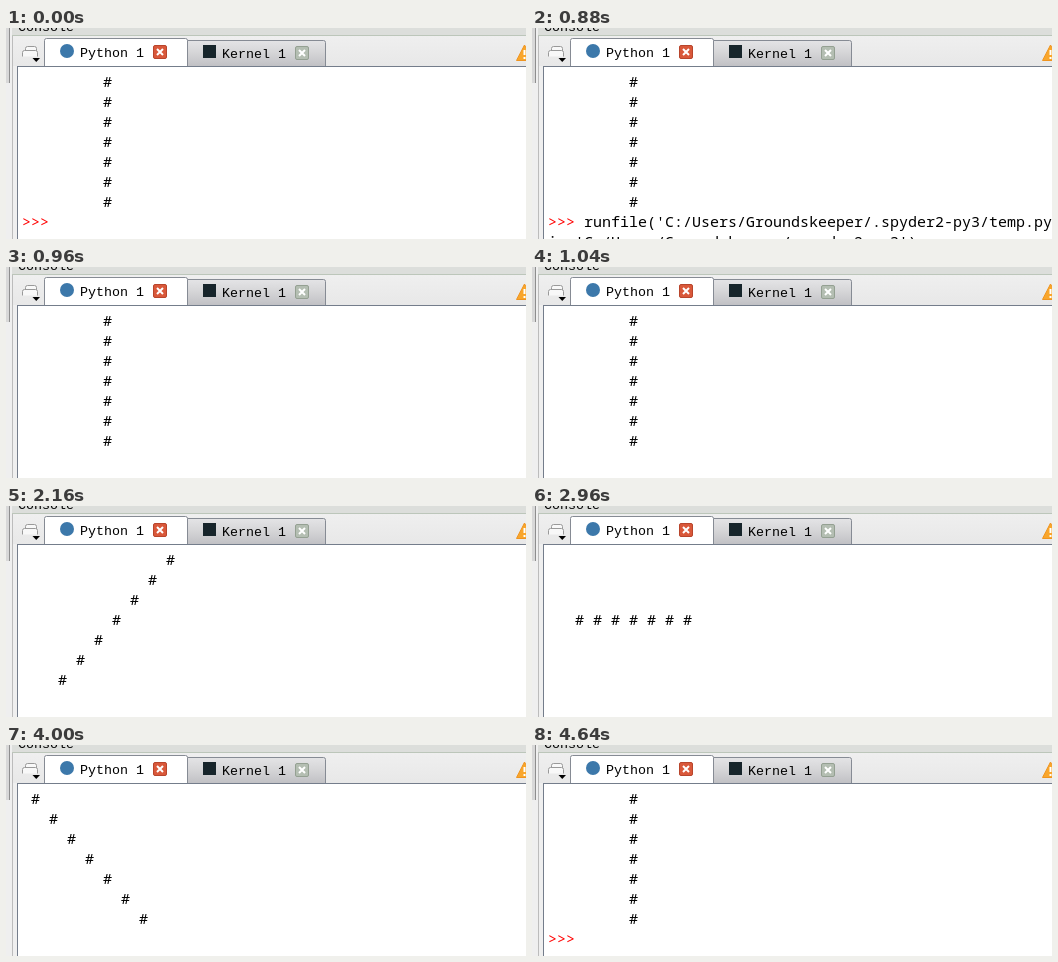
Write an HTML page that moves like this. It is 520x211 px and loops after 5.76 s.

```html
<!DOCTYPE html>
<html lang="en">
<head>
<meta charset="utf-8">
<title>Console</title>
<style>
html, body { margin: 0; width: 100%; height: 100%; overflow: hidden; background: #fff; }
svg { display: block; width: 520px; height: 211px; }
text { white-space: pre; }
.ui { font: 13.333px "Liberation Mono", monospace; fill: #000; }
.code { font: 15px "Noto Sans Mono", "DejaVu Sans Mono", monospace; fill: #000; }
.prompt { fill: #f00; }
.crisp { shape-rendering: crispEdges; }
</style>
</head>
<body>
<svg viewBox="0 0 520 211">
  <defs>
    <linearGradient id="bar" x2="0" y2="1">
      <stop stop-color="#efefef"/><stop offset="1" stop-color="#e8e8e8"/>
    </linearGradient>
    <linearGradient id="idle" x2="0" y2="1">
      <stop stop-color="#e4e4e6"/><stop offset=".45" stop-color="#d6d6d8"/><stop offset="1" stop-color="#c0c0c4"/>
    </linearGradient>
    <g id="cross">
      <rect x=".5" y=".5" width="13" height="13" rx="1.5"/>
      <path d="M4 4l6 6M10 4l-6 6" fill="none" stroke="#fff" stroke-width="2"/>
    </g>
  </defs>

  <rect width="520" height="211" fill="#efefef"/>
  <g class="crisp">
    <rect x="6" width="514" height="7" fill="#dcdedb"/>
    <rect x="6" y="7" width="514" height="1" fill="#bcc6ba"/>
    <rect x="6" y="8" width="514" height="30" fill="url(#bar)"/>
    <rect width="3" height="55" fill="#d8d8d8"/>
    <rect x="3" width="1" height="55" fill="#8e8e8e"/>
    <rect x="6" y="8" width="1" height="203" fill="#bcbcbc"/>
  </g>
  <text class="ui" x="12" y="3">Console</text>

  <path d="M181.500 38.500V12.500H317.500Q319.500 12.500 319.500 14.500V38.500Z" fill="url(#idle)" stroke="#868b94"/>
  <path d="M38.500 39V12.500Q38.500 10.500 40.500 10.500H179.500Q181.500 10.500 181.500 12.500V39" fill="#fff" stroke="#868b94"/>
  <rect class="crisp" x="11.500" y="38.500" width="520" height="180" fill="#fff" stroke="#747d8b"/>

  <g fill="#f8f8f8" stroke="#999">
    <path d="M19.500 24V20.500Q19.500 18.500 21.500 18.500H28.500Q30.500 18.500 30.500 20.500V24"/>
    <path d="M16.500 28.500V24.500Q16.500 22.500 18.500 22.500H29.500Q31.500 22.500 31.500 24.500V28.500"/>
  </g>
  <path d="M26.500 30h7.500l-3.750 4z"/>

  <circle cx="61" cy="23" r="7" fill="#3c78aa"/>
  <text class="ui" x="74" y="29">Python 1</text>
  <use href="#cross" x="147" y="17" fill="#d9583a" stroke="#b8452c"/>

  <rect class="crisp" x="197" y="17" width="13" height="13" fill="#17252b"/>
  <text class="ui" x="216" y="30">Kernel 1</text>
  <use href="#cross" x="289" y="18" fill="#b4beb2" stroke="#94a092"/>

  <path d="M518.500 17L527 32.500H510.500Z" fill="#f9a62b" stroke="#ee9420" stroke-linejoin="round"/>
  <path d="M518.500 22v5M518.500 29v2" stroke="#fff" stroke-width="2"/>

  <g id="marks" class="code"></g>
  <text id="prompt" class="code prompt" x="16" y="199">&gt;&gt;&gt;</text>
  <g id="command" class="code">
    <text x="52" y="199">runfile('C:/Users/Groundskeeper/.spyder2-py3/temp.py</text>
    <text x="16" y="219">ir='C:/Users/Groundskeeper/.spyder2-py3')</text>
  </g>
</svg>
<script>
const LOOP = 5760, CELL = 9, LINE = 20, COUNT = 7;
const byId = id => document.getElementById(id);

// column and row of the i-th mark in each pose
const poses = {
  upright: i => [9, i],
  slash: i => [16 - 2 * i, i],
  flat: i => [3 + 2 * i, 3],
  backslash: i => [1 + 2 * i, i]
};

const scenes = [
  { at: 0, pose: "upright", prompt: true },
  { at: 880, pose: "upright", prompt: true, command: true },
  { at: 960, pose: "upright" },
  { at: 2160, pose: "slash" },
  { at: 2960, pose: "flat" },
  { at: 4000, pose: "backslash" },
  { at: 4640, pose: "upright", prompt: true }
];

const marks = Array.from({ length: COUNT }, () => {
  const mark = document.createElementNS("http://www.w3.org/2000/svg", "text");
  mark.textContent = "#";
  return byId("marks").appendChild(mark);
});

const show = (id, on) => byId(id).setAttribute("visibility", on ? "visible" : "hidden");

function draw(ms) {
  const t = ms % LOOP;
  const scene = scenes.filter(s => s.at <= t).pop();
  marks.forEach((mark, i) => {
    const [col, row] = poses[scene.pose](i);
    mark.setAttribute("x", 16 + col * CELL);
    mark.setAttribute("y", 59 + row * LINE);
  });
  show("prompt", scene.prompt);
  show("command", scene.command);
}

const start = performance.now();
function tick() {
  draw(performance.now() - start);
  requestAnimationFrame(tick);
}
draw(0);
requestAnimationFrame(tick);
</script>
</body>
</html>
```
